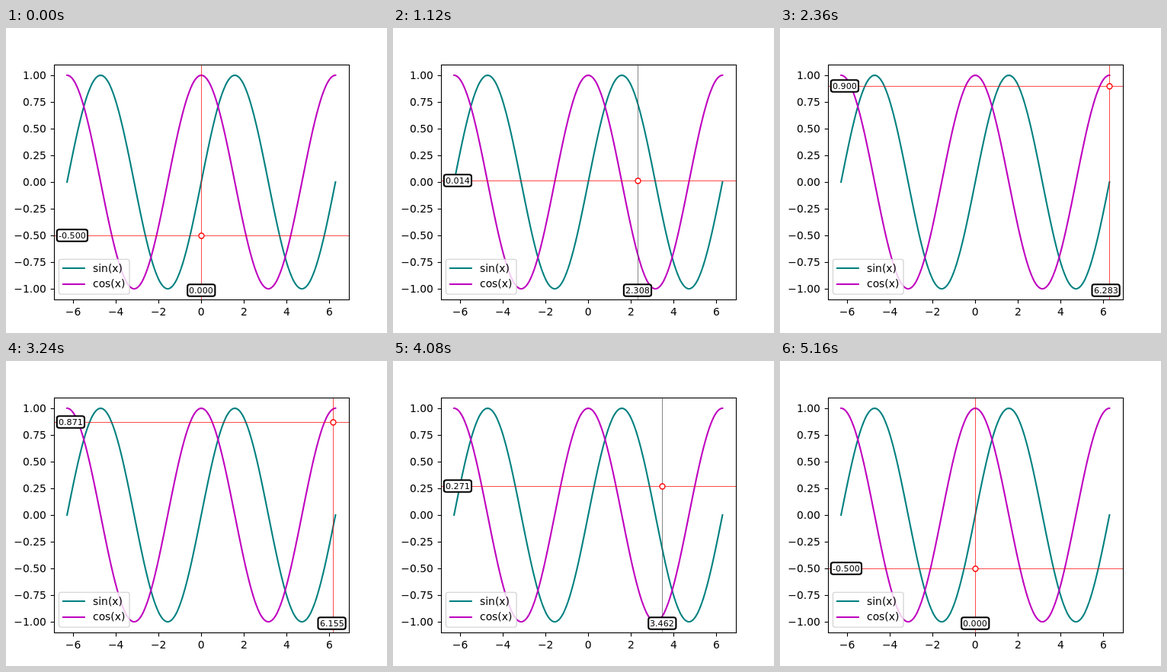
An HTML page that plays this animation: 500 px wide and 400 px high, repeating every 5200 ms.

```html
<!DOCTYPE html>
<html lang="en">
<head>
<meta charset="utf-8">
<title>Crosshair on sine and cosine</title>
<style>
  html, body { margin: 0; width: 100%; height: 100%; overflow: hidden; background: #fff; }
  svg { display: block; width: 500px; height: 400px; font: 13.89px "DejaVu Sans", sans-serif; }
  .axis { stroke: #000; stroke-width: 1.11; fill: none; }
  .curve { stroke-width: 2.08; fill: none; stroke-linecap: square; stroke-linejoin: round; }
  .sin { stroke: #008080; }
  .cos { stroke: #bf00bf; }
  .cross { stroke: #f00; stroke-opacity: .7; stroke-width: 1; }
  .cross.dim { stroke: #555; }
  .tag { font-size: 11.11px; }
  .tag rect { fill: #fff; stroke: #000; stroke-width: 2.08; }
</style>
</head>
<body>
<svg id="stage" viewBox="0 0 500 400"></svg>
<script>
const LOOP = 5200, STEP = 40, LAST = 49;
const LEFT = 63.5, RIGHT = 450.5, TOP = 48.5, BOTTOM = 356.5;
const TAU = 2 * Math.PI;
const stage = document.getElementById('stage');

const toX = x => 256.25 + x * 387.5 / 1.1 / (2 * TAU);
const toY = y => 202 - 140 * y;
const snap = v => Math.floor(v + 0.5) + 0.5;

function setAttrs(node, attrs) {
  for (const key in attrs) node.setAttribute(key, attrs[key]);
}

function add(name, attrs, parent = stage, text = '') {
  const node = document.createElementNS('http://www.w3.org/2000/svg', name);
  setAttrs(node, attrs);
  node.textContent = text;
  return parent.appendChild(node);
}

function addCurve(fn, name) {
  const points = [];
  for (let i = 0; i <= 200; i++) {
    const x = -TAU + 2 * TAU * i / 200;
    points.push(toX(x).toFixed(2) + ',' + toY(fn(x)).toFixed(2));
  }
  add('polyline', { class: 'curve ' + name, points: points.join(' ') });
}

const signed = (v, digits) => v.toFixed(digits).replace('-', '\u2212');

function addTicks() {
  for (let v = -6; v <= 6; v += 2) {
    const x = snap(toX(v));
    add('path', { class: 'axis', d: `M${x} ${BOTTOM}v4.86` });
    add('text', { x: toX(v), y: 377, 'text-anchor': 'middle' }, stage, signed(v, 0));
  }
  for (let v = -1; v <= 1; v += 0.25) {
    const y = snap(toY(v));
    add('path', { class: 'axis', d: `M${LEFT} ${y}h-4.86` });
    add('text', { x: 52.8, y: toY(v) + 5, 'text-anchor': 'end' }, stage, signed(v, 2));
  }
}

function addTag() {
  const group = add('g', { class: 'tag' });
  return {
    box: add('rect', { height: 15.4, rx: 3 }, group),
    label: add('text', {}, group)
  };
}

function placeTag(tag, value, left, middle) {
  const text = value.toFixed(3);
  const width = text[0] === '-' ? 35.8 : 31.8;
  tag.label.textContent = text;
  setAttrs(tag.label, { x: Math.round(left), y: Math.round(middle + 4) });
  setAttrs(tag.box, { x: left - 2.2, y: middle - 7.7, width: width + 4.4 });
}

function addLegend() {
  add('rect', {
    x: 69.44, y: 303.4, width: 92.6, height: 45.7, rx: 2.78,
    fill: '#fff', 'fill-opacity': 0.8, stroke: '#ccc', 'stroke-opacity': 0.8, 'stroke-width': 1.39
  });
  [['sin', 315, 320], ['cos', 336, 340]].forEach(([name, y, baseline]) => {
    add('path', { class: 'curve ' + name, d: `M75 ${y}h27.8` });
    add('text', { x: 114, y: baseline }, stage, name + '(x)');
  });
}

addTicks();
addCurve(Math.sin, 'sin');
addCurve(Math.cos, 'cos');
const across = add('line', { class: 'cross', x1: 63, x2: 450 });
const down = add('line', { class: 'cross', y1: 48, y2: 356 });
const dot = add('circle', { r: 3.47, fill: '#fff', stroke: '#f00', 'stroke-width': 1.39 });
add('rect', { class: 'axis', x: LEFT, y: TOP, width: RIGHT - LEFT, height: BOTTOM - TOP });
const yTag = addTag();
const xTag = addTag();
addLegend();

// Rest, run out, rest, run back.
function stepAt(time) {
  const tick = Math.floor(time / STEP);
  return tick < 80 ? Math.min(LAST, Math.max(0, tick - 10)) : LAST - (tick - 80);
}

let shown = -1;
function draw() {
  const step = stepAt(performance.now() % LOOP);
  if (step !== shown) {
    shown = step;
    const x = TAU * step / LAST, y = -0.5 + 1.4 * step / LAST;
    const px = toX(x), py = toY(y), cx = snap(px), cy = snap(py);
    setAttrs(across, { y1: cy, y2: cy });
    setAttrs(down, { x1: cx, x2: cx });
    down.classList.toggle('dim', step >= 16 && step <= 30);
    setAttrs(dot, { cx, cy });
    placeTag(yTag, y, 69, py);
    placeTag(xTag, x, Math.min(px - 15.9, 411.7), 344);
  }
  requestAnimationFrame(draw);
}
draw();
</script>
</body>
</html>
```
